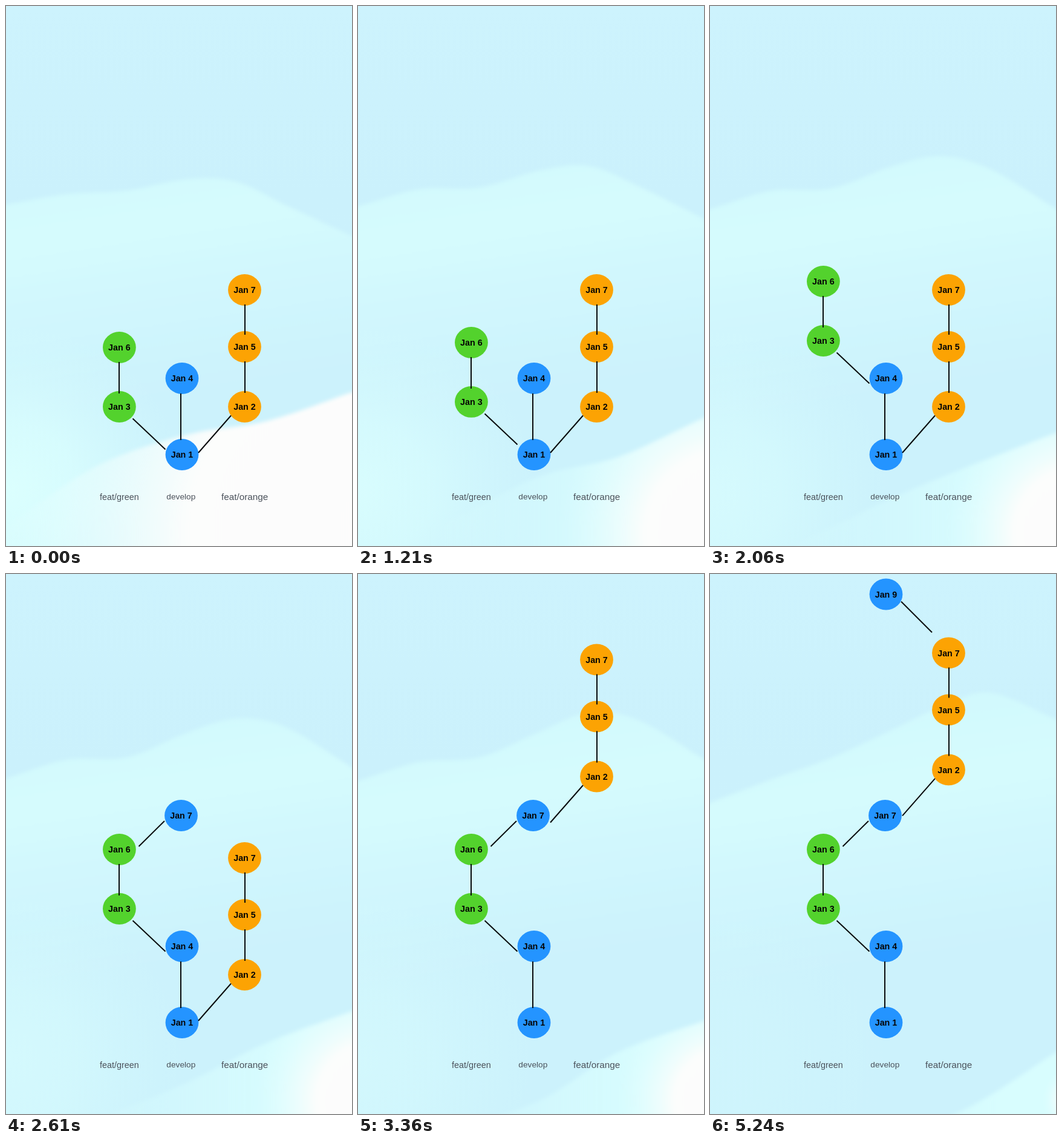
These frames come from a looping animation (572 px wide and 892 px high, 5.3 s). An HTML page:

```html
<!DOCTYPE html>
<html lang="en">
<head>
<meta charset="utf-8">
<title>Branch merge</title>
<style>
  html, body { margin: 0; width: 100%; height: 100%; overflow: hidden; background: #cdf3fd; }
  svg { display: block; width: 100vw; height: 100vh; }
  text { font-family: "Liberation Sans", Arial, sans-serif; text-anchor: middle; }
  .day { font-size: 14.3px; font-weight: 700; fill: #050505; }
  .label { fill: #4b525b; }
  line { stroke: #080a0c; stroke-width: 2; }
</style>
</head>
<body>
<svg viewBox="0 0 572 892" preserveAspectRatio="none">
  <defs>
    <linearGradient id="sky" x2="0" y2="1">
      <stop stop-color="#cdf3fd"/>
      <stop offset=".35" stop-color="#cbf1fc"/>
      <stop offset="1" stop-color="#ccf2fc"/>
    </linearGradient>
    <linearGradient id="crestFill" gradientUnits="userSpaceOnUse" x1="250" y1="240" x2="310" y2="640">
      <stop stop-color="#d2f9fd"/>
      <stop offset=".3" stop-color="#d5fbfd"/>
      <stop offset=".72" stop-color="#cff5fd"/>
      <stop offset="1" stop-color="#ccf2fc"/>
    </linearGradient>
    <radialGradient id="glowFill">
      <stop stop-color="#dbfffe"/>
      <stop offset=".4" stop-color="#d9fefe" stop-opacity=".8"/>
      <stop offset="1" stop-color="#d4fafd" stop-opacity="0"/>
    </radialGradient>
    <linearGradient id="shoreFill" gradientUnits="userSpaceOnUse" x1="120" y1="0" x2="480" y2="0">
      <stop stop-color="#d8fdfe" stop-opacity="0"/>
      <stop offset="1" stop-color="#d8fdfe"/>
    </linearGradient>
    <radialGradient id="foamFill" gradientUnits="userSpaceOnUse" cx="610" cy="870" r="640">
      <stop stop-color="#fdfcfc"/>
      <stop offset=".48" stop-color="#fcfdfc"/>
      <stop offset="1" stop-color="#e2fefe" stop-opacity="0"/>
    </radialGradient>
    <filter id="soft" x="-10%" y="-10%" width="120%" height="120%"><feGaussianBlur stdDeviation="3"/></filter>
  </defs>
  <rect width="572" height="892" fill="url(#sky)"/>
  <path id="crest" fill="url(#crestFill)" filter="url(#soft)"/>
  <ellipse id="glow" cx="0" cy="800" rx="300" ry="280" fill="url(#glowFill)"/>
  <g filter="url(#soft)">
    <path id="shore" fill="url(#shoreFill)"/>
    <path id="foam" fill="url(#foamFill)"/>
  </g>
  <g id="graph"></g>
</svg>
<script>
const LOOP = 5300;
const BLUE = '#2494ff', GREEN = '#53d22d', ORANGE = '#fca303';
const byId = id => document.getElementById(id);

function add(parent, tag, attrs = {}, text = '') {
  const el = document.createElementNS('http://www.w3.org/2000/svg', tag);
  for (const key in attrs) el.setAttribute(key, attrs[key]);
  el.textContent = text;
  parent.appendChild(el);
  return el;
}

const group = () => add(byId('graph'), 'g');

function commit(parent, x, y, day, fill) {
  add(parent, 'ellipse', { cx: x, cy: y, rx: 27.4, ry: 25.9, fill });
  add(parent, 'text', { x, y: y + 5.2, class: 'day' }, 'Jan ' + day);
}

const link = (parent, x1, y1, x2, y2) => add(parent, 'line', { x1, y1, x2, y2 });

const label = (x, y, size, text) =>
  add(byId('graph'), 'text', { x, y, class: 'label', 'font-size': size }, text);

const develop = group(), green = group(), orange = group();
const firstMerge = group(), secondMerge = group();

commit(develop, 291, 741, 1, BLUE);
commit(develop, 291, 615, 4, BLUE);
link(develop, 289, 640, 289, 717);

commit(green, 187.4, 662, 3, GREEN);
commit(green, 187.4, 564, 6, GREEN);
link(green, 187, 588, 187, 640);
link(green, 209.5, 681.5, 263.5, 732.5);

commit(orange, 394.5, 662, 2, ORANGE);
commit(orange, 394.5, 563, 5, ORANGE);
commit(orange, 394.5, 469, 7, ORANGE);
link(orange, 395, 493, 395, 543);
link(orange, 395, 587, 395, 639);
link(orange, 372, 676.5, 318, 738);

commit(firstMerge, 289.5, 399, 7, BLUE);
link(firstMerge, 262, 408, 219.5, 450);

commit(secondMerge, 291, 33.5, 9, BLUE);
link(secondMerge, 316, 45.5, 367, 96.5);

label(187.3, 816, 14.4, 'feat/green');
label(289.3, 815, 13.7, 'develop');
label(394.7, 816, 15.3, 'feat/orange');

// Backdrop poses: heights of both edges, foam radius and glow strength.
const CREST_X = [0, 100, 200, 300, 380, 460, 572];
const SHORE_X = [0, 150, 300, 430, 572];
const POSES = [
  { at: 0, crest: [328, 311, 305, 286, 290, 328, 380], shore: [860, 760, 708, 686, 638], foam: 640, glow: 1 },
  { at: 1210, crest: [331, 303, 300, 272, 264, 296, 352], shore: [900, 850, 777, 745, 680], foam: 280, glow: .8 },
  { at: 1580, crest: [334, 304, 300, 268, 256, 282, 348], shore: [920, 870, 790, 746, 690], foam: 240, glow: .7 },
  { at: 2610, crest: [338, 307, 303, 262, 239, 252, 320], shore: [950, 900, 840, 775, 722], foam: 200, glow: .55 },
  { at: 3360, crest: [342, 311, 303, 261, 229, 240, 306], shore: [960, 920, 870, 790, 738], foam: 180, glow: .45 },
  { at: 5240, crest: [378, 340, 304, 258, 220, 196, 240], shore: [980, 950, 930, 880, 790], foam: 60, glow: .2 }
];

const mix = (a, b, k) => a + (b - a) * k;
const progress = (t, start, length) => Math.min(1, Math.max(0, (t - start) / length));
const ease = p => (1 - Math.cos(Math.PI * p)) / 2;

function poseAt(t) {
  const next = POSES.findIndex(p => p.at > t);
  if (next < 0) return POSES[POSES.length - 1];
  const a = POSES[next - 1], b = POSES[next];
  const k = (t - a.at) / (b.at - a.at);
  const blend = key => a[key].map((v, i) => mix(v, b[key][i], k));
  return { crest: blend('crest'), shore: blend('shore'), foam: mix(a.foam, b.foam, k), glow: mix(a.glow, b.glow, k) };
}

// Smooth curve through the points, closed below the stage.
function landPath(xs, ys) {
  const last = xs.length - 1;
  const slope = i => {
    const a = Math.max(0, i - 1), b = Math.min(last, i + 1);
    return (ys[b] - ys[a]) / (xs[b] - xs[a]);
  };
  let d = `M-30 ${ys[0] - 30 * slope(0)}L${xs[0]} ${ys[0]}`;
  for (let i = 0; i < last; i++) {
    const h = (xs[i + 1] - xs[i]) / 3;
    d += `C${xs[i] + h} ${ys[i] + h * slope(i)} ${xs[i + 1] - h} ${ys[i + 1] - h * slope(i + 1)} ${xs[i + 1]} ${ys[i + 1]}`;
  }
  return d + `L602 ${ys[last] + 30 * slope(last)}V1020H-30Z`;
}

function draw(t) {
  const pose = poseAt(t);
  const shore = landPath(SHORE_X, pose.shore);
  byId('crest').setAttribute('d', landPath(CREST_X, pose.crest));
  byId('shore').setAttribute('d', shore);
  byId('foam').setAttribute('d', shore);
  byId('foamFill').setAttribute('r', pose.foam);
  byId('glow').setAttribute('opacity', pose.glow);

  const lift = (el, distance, start, length) =>
    el.setAttribute('transform', `translate(0 ${-distance * ease(progress(t, start, length))})`);
  lift(green, 109, 1094, 668);
  lift(orange, 338.6, 2758, 682);
  firstMerge.setAttribute('opacity', ease(progress(t, 2130, 400)));
  secondMerge.setAttribute('opacity', ease(progress(t, 3810, 400)));
}

const begin = performance.now();
function tick() {
  draw((performance.now() - begin) % LOOP);
  requestAnimationFrame(tick);
}
tick();
</script>
</body>
</html>
```
